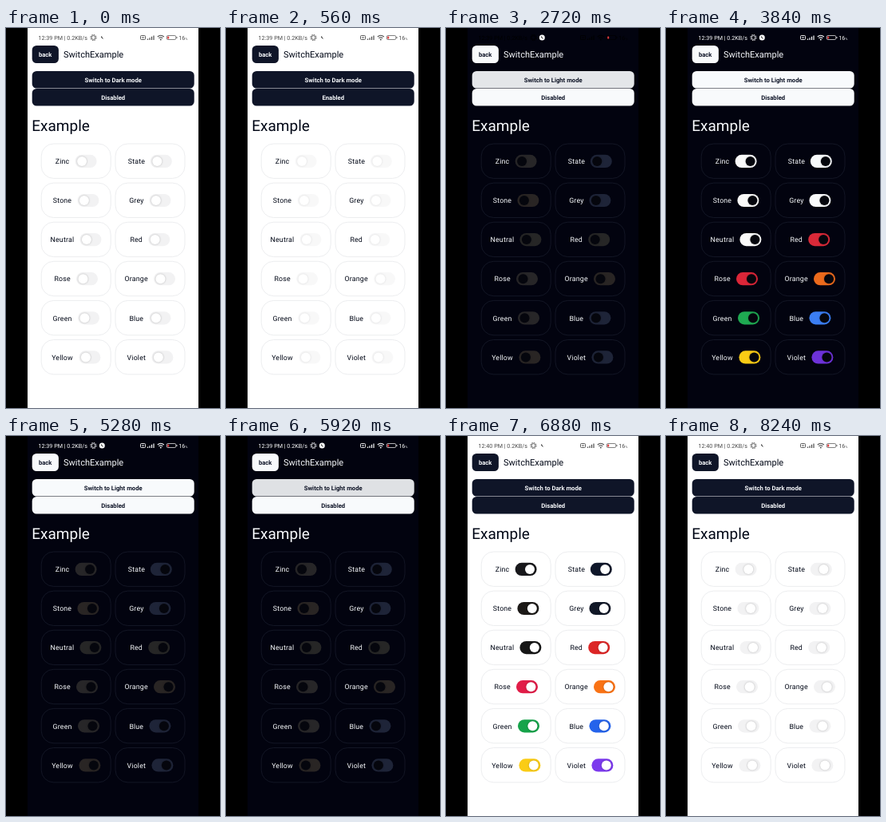
Animation, 268 px wide and 476 px high, one loop 8.32 s. Source, as an HTML page:

```html
<!DOCTYPE html>
<html lang="en">
<head>
<meta charset="utf-8">
<title>Switch example</title>
<style>
  html, body { margin: 0; width: 100%; height: 100%; overflow: hidden; background: #000; }
  svg {
    display: block; width: 100vw; height: 100vh;
    font-family: Roboto, sans-serif; text-rendering: geometricPrecision;
    --bg: #fff; --ink: #020817; --fill: #0f1528; --on-fill: #f8fafc; --line: #e4e5e9; --knob: #fff;
  }
  svg.dark {
    --bg: #02030f; --ink: #f8fafc; --fill: #f8fafc; --on-fill: #0f1528; --line: #1b1f2e; --knob: #05060d;
  }
  .bg { fill: var(--bg); }
  .ink { fill: var(--ink); }
  .btn rect { fill: var(--fill); }
  .btn text { fill: var(--on-fill); font-size: 7.7px; font-weight: 700; text-anchor: middle; }
  .card { fill: none; stroke: var(--line); stroke-width: .7; }
  .label { fill: var(--ink); font-size: 8.8px; letter-spacing: .17px; }
  .knob { fill: var(--knob); filter: drop-shadow(0 .8px .8px rgba(0, 0, 0, .25)); }
  .status { font-size: 7.2px; }
  .status .o { fill: none; stroke: currentColor; }
  .status .s { fill: currentColor; }
</style>
</head>
<body>
<svg id="stage" viewBox="0 0 268 476">
  <rect width="268" height="476"/>
  <rect class="bg" x="27" width="214" height="476"/>
  <g class="status" id="status">
    <text class="s" id="clock" x="40.5" y="14.6"></text>
    <circle class="o" cx="109.5" cy="12" r="2.4" stroke-width=".8"/>
    <circle class="o" cx="109.5" cy="12" r="3.6" stroke-width="1" stroke-dasharray="1.6 1.2"/>
    <circle cx="120.3" cy="12" r="3.5" fill="#fff"/>
    <path d="M119.8 10.4v1.6l1.6 1.3" fill="none" stroke="#111" stroke-width="1"/>
    <rect class="o" x="168.5" y="9.5" width="6" height="5" rx="1" stroke-width=".9"/>
    <path class="o" d="M170 12h3" stroke-width="1"/>
    <path class="o" d="M177.5 15v-1.6M180 15v-2.8M182.500 15v-4.200M185 15v-5.600" stroke-width="1.200"/>
    <path class="o" d="M189.800 11q4-3.600 8 0M191.400 12.800q2.400-2 4.800 0" stroke-width="1.100"/>
    <circle class="s" cx="193.800" cy="14.500" r=".9"/>
    <rect class="o" x="201.300" y="9.500" width="11.500" height="5" rx="1.400" stroke-width=".7"/>
    <path class="o" d="M213.900 11v2" stroke-width=".9"/>
    <rect x="202.200" y="10.400" width="2" height="3.200" rx=".5" fill="#e0393b"/>
    <text class="s" x="216.300" y="14.600">16<tspan font-size="4">%</tspan></text>
  </g>
  <g class="btn"><rect x="32.700" y="22" width="33.200" height="22" rx="5.500"/><text x="49.200" y="35.700">back</text></g>
  <text class="ink" x="72" y="37" font-size="11.050">SwitchExample</text>
  <g class="btn" id="theme"><rect x="32.700" y="54" width="203" height="21.600" rx="5.500"/><text x="134.200" y="67.500"></text></g>
  <g class="btn" id="toggle"><rect x="32.700" y="76" width="203" height="21.600" rx="5.500"/><text x="134.200" y="89.500"></text></g>
  <text class="ink" x="32.300" y="128.800" font-size="19">Example</text>
  <g id="cards"></g>
</svg>
<script>
const LOOP = 8320, STEP = 80;
const $ = id => document.getElementById(id);

// name, label x, switch x, dark off, dark on, light on
const rows = [
  ['Zinc', 61.8, 86.6, '#272628', '#fafafa', '#18181b'],
  ['State', 152.8, 180.8, '#1e2438', '#f8fafc', '#0f172a'],
  ['Stone', 58.8, 89.4, '#292524', '#fafaf9', '#1c1917'],
  ['Grey', 154.2, 179.4, '#1e2438', '#f9fafb', '#111827'],
  ['Neutral', 55.6, 92.4, '#262626', '#fafafa', '#171717'],
  ['Red', 155.4, 178.2, '#262626', '#da2938', '#dc2626'],
  ['Rose', 60.4, 88, '#272628', '#dc2638', '#e11d48'],
  ['Orange', 148.6, 185, '#292524', '#ec6a1c', '#f97316'],
  ['Green', 58.6, 90, '#272628', '#1faa52', '#16a34a'],
  ['Blue', 154.4, 179.4, '#1e2438', '#3b7ef2', '#2563eb'],
  ['Yellow', 57.2, 91.4, '#292524', '#facc15', '#facc15'],
  ['Violet', 151.6, 182.4, '#1e2438', '#6d32d9', '#7c3aed'],
];

$('cards').innerHTML = rows.map(([name, lx, sx], i) => {
  const y = 145 + 49.1 * (i >> 1), mid = y + 22;
  return `<rect class="card" x="${i % 2 ? 137 : 44.2}" y="${y}" width="87" height="43.4" rx="15.5"/>
    <text class="label" x="${lx}" y="${mid + 3.1}">${name}</text>
    <g class="switch"><rect class="track" x="${sx}" y="${mid - 8.2}" width="27" height="16.2" rx="8.1"/>
    <circle class="knob" cx="${sx + 8.5}" cy="${mid - .1}" r="6"/></g>`;
}).join('');

const all = sel => [...document.querySelectorAll(sel)];
const switches = all('.switch'), tracks = all('.track'), knobs = all('.knob');
const within = (t, a, b) => t >= a && t < b;
const ease = p => p < .5 ? 2 * p * p : 1 - 2 * (1 - p) ** 2;
const ramp = (t, start, len) => ease(Math.min(1, Math.max(0, (t - start) / len)));

// value of the last step reached
const at = (t, steps) => steps.reduce((v, [time, next]) => t >= time ? next : v, 1);
const themeAlpha = [[2560, .9], [2720, .92], [2800, .96], [2880, 1], [5920, .9], [6080, .93], [6160, 1]];
const toggleAlpha = [[320, .95], [400, .9], [480, .95], [560, 1], [2000, .9], [2240, 1]];
const switchAlpha = [[480, .5], [2240, 1]];

function setButton(id, text, alpha) {
  $(id).lastChild.textContent = text;
  $(id).setAttribute('opacity', alpha);
}

function draw(t) {
  const dark = within(t, 2720, 6080);
  const on = within(t, 3600, 5280) || within(t, 6720, 8160);
  const shift = 10.5 * (ramp(t, 3560, 240) - ramp(t, 5250, 190) + ramp(t, 6680, 240) - ramp(t, 8160, 240));

  $('stage').classList.toggle('dark', dark);
  // the status bar follows the theme one step late
  $('status').style.color = within(t, 2800, 6160) ? '#fff' : dark ? '#000' : '#4a4a4a';
  if (within(t, 6080, 6160)) $('status').style.color = '#fff';
  $('clock').textContent = `12:${t < 6320 ? 39 : 40} PM | 0.2KB/s`;

  setButton('theme', `Switch to ${dark ? 'Light' : 'Dark'} mode`, at(t, themeAlpha));
  setButton('toggle', within(t, 480, 2240) ? 'Enabled' : 'Disabled', at(t, toggleAlpha));

  rows.forEach(([, , , darkOff, darkOn, lightOn], i) => {
    const off = dark ? darkOff : '#f2f2f3';
    tracks[i].setAttribute('fill', on ? (dark ? darkOn : lightOn) : off);
    knobs[i].setAttribute('transform', `translate(${shift} 0)`);
    switches[i].setAttribute('opacity', at(t, switchAlpha));
  });
}

const begin = performance.now();
let last = -1;
function tick() {
  const t = Math.floor((performance.now() - begin) % LOOP / STEP) * STEP;
  if (t !== last) draw(last = t);
  requestAnimationFrame(tick);
}
tick();
</script>
</body>
</html>
```
